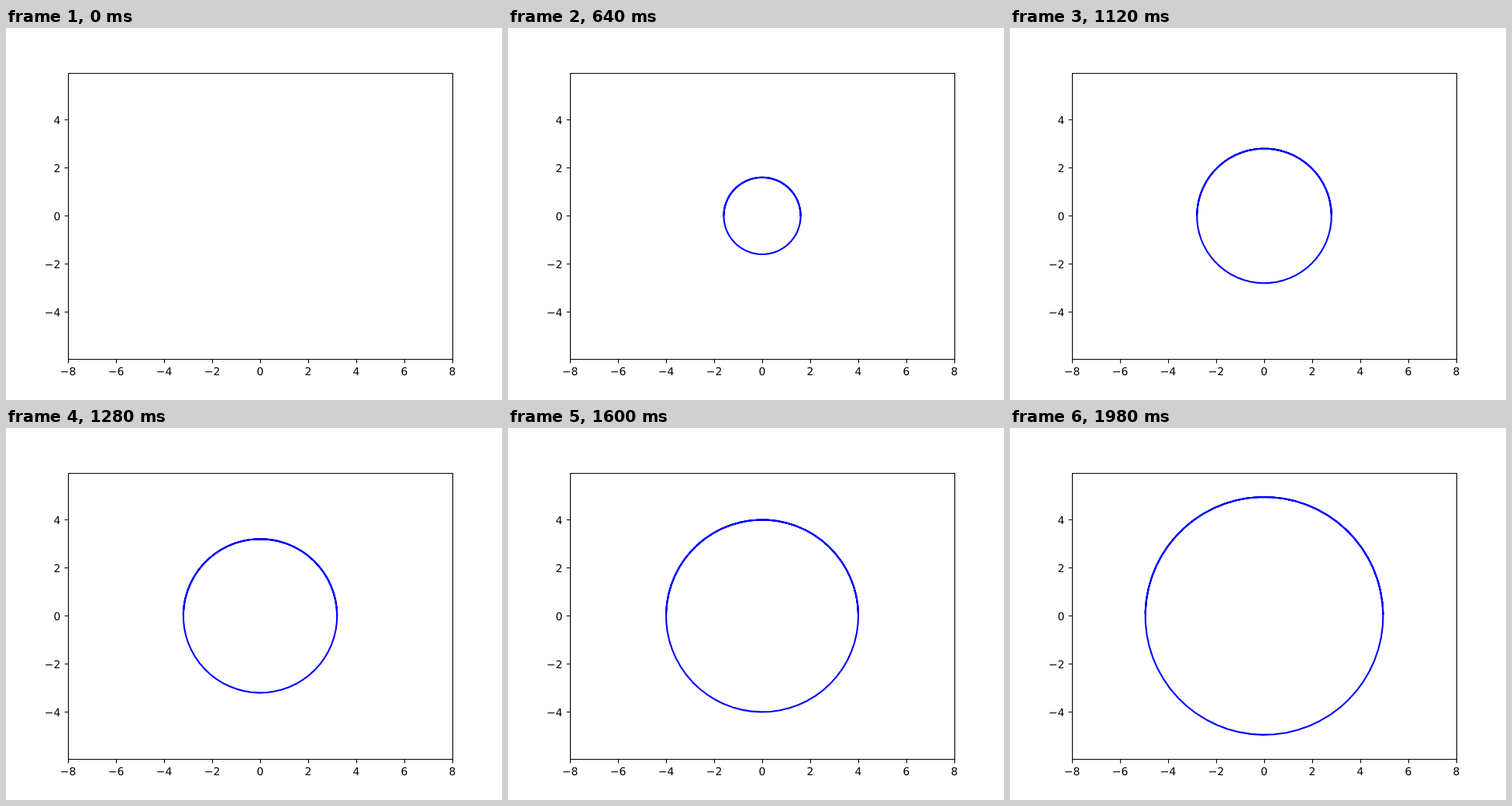
An HTML page for the animation above (2 s loop, 640x480 px).

```html
<!DOCTYPE html>
<html lang="en">
<head>
<meta charset="utf-8">
<title>Growing circle</title>
<style>
  html, body { margin: 0; width: 100%; height: 100%; overflow: hidden; background: #fff; }
  svg { display: block; }
  text { font: 13.89px "DejaVu Sans", sans-serif; text-rendering: geometricPrecision; }
  #axes { fill: none; stroke: #000; stroke-width: 1.11; }
  #curve { fill: none; stroke: #00f; stroke-width: 2.083; stroke-linejoin: round; stroke-linecap: square; isolation: isolate; }
  /* the overlapping half lap adds its edge coverage, so it looks heavier */
  #overlap { mix-blend-mode: plus-lighter; }
</style>
</head>
<body>
<svg width="640" height="480" viewBox="0 0 640 480">
  <g id="labels"></g>
  <g id="curve"><path id="lap"/><path id="overlap"/></g>
  <path id="axes"/>
</svg>
<script>
const UNIT = 31, CX = 328, CY = 242.4;
const STEP = 0.1, LAP_END = 63, LAST = 94;
const FRAME_MS = 20, FRAMES = 100, GROWTH = 0.05;

const byId = id => document.getElementById(id);
const lap = byId("lap"), overlap = byId("overlap");

function addLabel(value, x, y, anchor) {
  const label = document.createElementNS("http://www.w3.org/2000/svg", "text");
  label.setAttribute("x", x);
  label.setAttribute("y", y);
  label.setAttribute("text-anchor", anchor);
  label.textContent = String(value).replace("-", "\u2212");
  byId("labels").append(label);
}

function drawAxes() {
  let d = "M80.5 58.5H576.5V427.5H80.5Z";
  for (let v = -8; v <= 8; v += 2) {
    const x = CX + v * UNIT;
    d += `M${x + 0.5} 427.5V432.4`;
    addLabel(v, x, 448, "middle");
  }
  for (let v = -4; v <= 4; v += 2) {
    const y = 242 - v * UNIT;
    d += `M80.5 ${y + 0.5}H75.6`;
    addLabel(v, 70.3, y + 6, "end");
  }
  byId("axes").setAttribute("d", d);
}

function arc(radius, from, to) {
  const points = [];
  for (let i = from; i <= to; i++) {
    const x = CX + radius * Math.cos(i * STEP);
    const y = CY - radius * Math.sin(i * STEP);
    points.push(x.toFixed(3) + " " + y.toFixed(3));
  }
  return "M" + points.join("L");
}

function render(ms) {
  const frame = Math.floor(ms / FRAME_MS + 1e-6) % FRAMES;
  const radius = frame * GROWTH * UNIT;
  lap.setAttribute("d", frame ? arc(radius, 0, LAP_END) : "");
  overlap.setAttribute("d", frame ? arc(radius, LAP_END, LAST) : "");
}

drawAxes();
const start = performance.now();
function tick() {
  render(performance.now() - start);
  requestAnimationFrame(tick);
}
tick();
</script>
</body>
</html>
```
